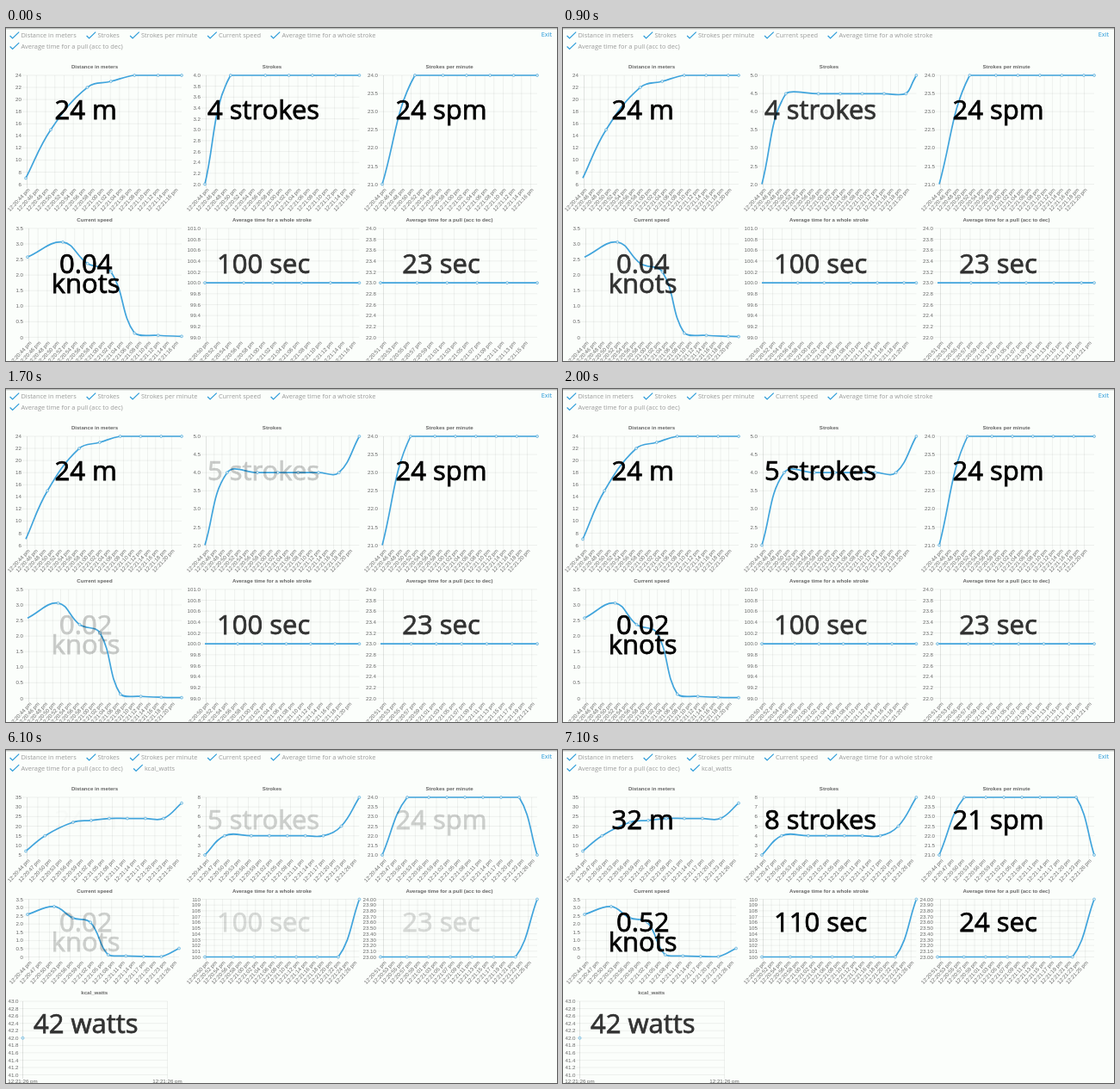
Recreate the animation shown at these times as an HTML page. Size 640 by 387 pixels, loop 8 s.

```html
<!DOCTYPE html>
<html lang="en">
<head>
<meta charset="utf-8">
<title>Rowing dashboard</title>
<style>
  html, body { margin: 0; width: 100%; height: 100%; overflow: hidden; background: #fbfefb; }
  svg { display: block; width: 640px; height: 387px; }
  .menu { font: 7.4px "Open Sans", "Noto Sans", sans-serif; fill: #999; }
  .exit { fill: #2196d8; }
  .check { fill: none; stroke: #2b9bd9; stroke-width: 1.15; }
  .title { font: bold 6.1px "Liberation Sans", Arial, sans-serif; fill: #666; text-anchor: middle; }
  .tick { font: 6.2px "Liberation Sans", Arial, sans-serif; fill: #666; text-anchor: end; }
  .mid { text-anchor: middle; }
  .grid { fill: none; stroke: #000; stroke-opacity: .1; stroke-width: .55; }
  .axis { fill: none; stroke: #000; stroke-opacity: .2; stroke-width: .55; }
  .line { fill: none; stroke: #40a4dc; stroke-width: 1.7; }
  .dot { fill: #dcebf1; stroke: #40a4dc; stroke-width: .6; }
  .value { font: 31px "Open Sans", "Noto Sans", sans-serif; text-anchor: middle; stroke: #000; stroke-width: .75; }
</style>
</head>
<body>
<svg id="stage" viewBox="0 0 640 387"></svg>
<script>
const LOOP = 8000, STEP = 100;
const FIRST_UPDATE = 700, SECOND_UPDATE = 5800, RESIZE = 5900;
const TALL = 126.5, SHORT = 67;
const stage = document.getElementById('stage');

// Sample times: a start, an irregular second sample, then regular ones.
const times = (second, third, gap, count) =>
  [0, second, ...Array.from({ length: count - 2 }, (_, i) => third + i * gap)];
const steady = (value, count, last) => [...Array(count - 1).fill(value), last];

// Scales are [min, max, step, decimals] for each of the three data phases.
const charts = [
  { title: 'Distance in meters', col: 0, row: 0, x0: 23, x1: 204, start: 44,
    times: times(5.4, 13.3, 5.1, 9), data: [7, 15, 22, 23, 24, 24, 24, 24, 32],
    scales: [[6, 24, 2, 0], [6, 24, 2, 0], [5, 35, 5, 0]],
    words: ['24 m', '24 m', '32 m'], begin: 5715, fade: 5725 },
  { title: 'Strokes', col: 1, row: 0, x0: 231, x1: 410.4, start: 44,
    times: times(5.6, 13.2, 5.12, 9), data: [2, 4, 4, 4, 4, 4, 4, 5, 8],
    scales: [[2, 4, .2, 1], [2, 5, .5, 1], [2, 8, 1, 0]],
    words: ['4 strokes', '5 strokes', '8 strokes'] },
  { title: 'Strokes per minute', col: 2, row: 0, x0: 437, x1: 617, start: 44,
    times: times(7.1, 13.2, 5.12, 9), data: [21, ...steady(24, 8, 21)],
    scales: Array(3).fill([21, 24, .5, 1]),
    words: ['24 spm', '24 spm', '21 spm'] },
  { title: 'Current speed', col: 0, row: 1, x0: 25, x1: 204, resizedX1: 201, start: 44,
    times: times(7.7, 13.1, 5.13, 9), data: [2.58, 3.06, 2.37, 2.1, .13, .06, .03, .02, .52],
    scales: Array(3).fill([0, 3.5, .5, 1]),
    words: ['0.04 knots', '0.02 knots', '0.52 knots'] },
  { title: 'Average time for a whole stroke', col: 1, row: 1, x0: 231, x1: 410.4, start: 50,
    times: times(6.9, 12, 5.12, 8), data: steady(100, 8, 110),
    scales: [[99, 101, .2, 1], [99, 101, .2, 1], [100, 110, 1, 0]],
    words: ['100 sec', '100 sec', '110 sec'], shade: .8 },
  { title: 'Average time for a pull (acc to dec)', col: 2, row: 1, x0: 435, x1: 617, start: 51,
    times: times(6.2, 11.3, 5.1, 8), data: steady(23, 8, 24), inset: 3.5, lastTicks: [75, 81, 85],
    scales: [[22, 24, .2, 1], [22, 24, .2, 1], [23, 24, .1, 2]],
    words: ['23 sec', '23 sec', '24 sec'], shade: .8 }
];

const clamp = (v, lo, hi) => Math.min(hi, Math.max(lo, v));
const mix = (a, b, p) => a + (b - a) * p;
const easeOut = p => 1 - (1 - clamp(p, 0, 1)) ** 4;
const swing = p => .5 - Math.cos(Math.PI * clamp(p, 0, 1)) / 2;
const r = v => +v.toFixed(2);
const text = (cls, x, y, str, extra = '') =>
  `<text class="${cls}" x="${r(x)}" y="${r(y)}" ${extra}>${str}</text>`;
const path = (cls, d) => `<path class="${cls}" d="${d}"/>`;
const dot = (x, y) => `<circle class="dot" cx="${r(x)}" cy="${r(y)}" r="1.5"/>`;
const clock = s => `12:${20 + Math.floor(s / 60)}:${String(s % 60).padStart(2, '0')} pm`;

function menu(t) {
  const items = [[4.6, 0, 'Distance in meters'], [93.6, 0, 'Strokes'], [144.1, 0, 'Strokes per minute'],
    [234.1, 0, 'Current speed'], [307.6, 0, 'Average time for a whole stroke'],
    [4.6, 1, 'Average time for a pull (acc to dec)']];
  if (t >= SECOND_UPDATE) items.push([148.1, 1, 'kcal_watts']);
  return '<rect width="640" height="1.4" fill="#bcbebc"/>' +
    items.map(([x, row, str]) => path('check', `M${x} ${9 + row * 12.5}l3 3l7.6-7.4`) +
      text('menu', x + 12.8, 11.2 + row * 12.3, str)).join('') +
    text('menu exit', 621.7, 10.3, 'Exit');
}

function yAxis(x0, x1, top, height, [min, max, step, decimals]) {
  const count = Math.round((max - min) / step);
  let d = '', out = '';
  for (let i = 0; i <= count; i++) {
    const y = top + height * (1 - i / count), v = min + i * step;
    d += `M${x0 - 4} ${r(y)}H${x1}`;
    out += text('tick', x0 - 5, y + 2.1, v ? v.toFixed(decimals) : '0');
  }
  return path('grid', d) + out;
}

function xAxis(chart, phase, x1, top, height) {
  const { x0, start, inset = 1.5, lastTicks = [76, 80, 86] } = chart;
  const step = phase === 2 && start === 44 ? 3 : 2;
  const range = chart.times[sampleCount(chart, phase) - 1];
  const bottom = top + height;
  let d = '', out = '';
  for (let s = start; s <= lastTicks[phase]; s += step) {
    const x = x0 + inset + (s - start) / range * (x1 - x0);
    if (s > start) d += `M${r(x)} ${top}V${bottom + 4.5}`;
    out += `<g transform="translate(${r(x + 2)} ${bottom + 5.5}) rotate(-47)">${text('tick', 0, 2.1, clock(s))}</g>`;
  }
  return path('grid', d) + path('axis', `M${x0 + inset} ${top}V${bottom + 4.5}`) + out;
}

const sampleCount = (chart, phase) => chart.data.length - 2 + phase;

// Returns [x, y, handle in x, y, handle out x, y] for every sample.
function nodes(chart, phase, x1, top, height) {
  const count = sampleCount(chart, phase), [min, max] = chart.scales[phase];
  const range = chart.times[count - 1];
  const pts = chart.data.slice(0, count).map((v, i) => [
    chart.x0 + chart.times[i] / range * (x1 - chart.x0),
    top + height * (1 - (v - min) / (max - min))]);
  return pts.map((p, i) => {
    const a = pts[i - 1] || p, b = pts[i + 1] || p;
    const before = Math.hypot(p[0] - a[0], p[1] - a[1]);
    const after = Math.hypot(b[0] - p[0], b[1] - p[1]);
    const handle = k => [
      clamp(p[0] + k * (b[0] - a[0]), chart.x0, x1),
      clamp(p[1] + k * (b[1] - a[1]), top, top + height)];
    const tension = .4 / (before + after);
    return [...p, ...handle(-tension * before), ...handle(tension * after)];
  });
}

function curve(list, hideFirst) {
  const d = list.map((n, i) => i
    ? `C${[...list[i - 1].slice(4), n[2], n[3], n[0], n[1]].map(r)}`
    : `M${r(n[0])} ${r(n[1])}`).join('');
  return path('line', d) + list.slice(hideFirst ? 1 : 0).map(n => dot(n[0], n[1])).join('');
}

function plot(chart, t) {
  const phase = t < FIRST_UPDATE ? 0 : t < SECOND_UPDATE ? 1 : 2;
  const resized = t >= RESIZE;
  const height = resized ? SHORT : TALL;
  const top = chart.row ? (phase === 2 ? 173.5 : 232.9) : 55;
  const x1 = phase === 2 && chart.resizedX1 || chart.x1;
  const begin = phase === 1 ? 738 : chart.begin || 5747;
  const progress = phase === 0 || resized ? 1 : easeOut((t - begin) / 1000);
  let list = nodes(chart, phase, x1, top, height);
  if (progress < 1) {
    const old = nodes(chart, phase - 1, chart.x1, top, height);
    list = list.map((n, i) => old[i] ? n.map((v, k) => mix(old[i][k], v, progress)) : n);
  }
  return text('title', 103 + chart.col * 206, top - 7.6, chart.title) +
    yAxis(chart.x0, x1, top, height, chart.scales[phase]) +
    xAxis(chart, phase, x1, top, height) + curve(list, progress < 1);
}

const dip = (t, start) => 1 - swing((t - start) / 400) + swing((t - start - 800) / 400);

function value(chart, t) {
  const { words, col, row, shade = 1, fade = 5810 } = chart;
  const index = t >= fade + 600 ? 2 : t >= 1385 ? 1 : 0;
  let opacity = (index === 2 ? 1 : shade) * dip(t, fade);
  if (words[0] !== words[1]) opacity *= dip(t, 783);
  const moved = t >= SECOND_UPDATE;
  const y = row ? (moved ? 210.5 : 284.5) : (moved ? 92 : 106);
  const lines = row === 1 && col === 0 ? words[index].split(' ') : [words[index]];
  return lines.map((str, i) =>
    text('value', 92.7 + col * 206.4, y + i * 23.7, str, `opacity="${r(opacity)}"`)).join('');
}

function watts(t) {
  const settled = t >= RESIZE;
  const x0 = 19.5, x1 = settled ? 187.5 : 219.5, top = 292, height = 85.5, bottom = top + height;
  const y = settled ? top + height / 2 : 370;
  return text('title', settled ? 102.7 : 118.5, top - 7.6, 'kcal_watts') +
    yAxis(x0, x1, top, height, [41, 43, .2, 1]) +
    path('grid', `M${x1} ${top}V${bottom + 4.5}`) +
    path('axis', `M${x0} ${top}V${bottom + 4.5}`) +
    [x0, x1].map(x => text('tick mid', x, 386.8, clock(86))).join('') +
    dot(x0, y) + text('value', 92.7, 329, '42 watts', 'opacity=".8"');
}

function render(t) {
  stage.innerHTML = menu(t) + charts.map(c => plot(c, t)).join('') +
    (t >= SECOND_UPDATE ? watts(t) : '') + charts.map(c => value(c, t)).join('');
}

let shown = -1;
function tick() {
  const t = Math.floor(performance.now() % LOOP / STEP) * STEP;
  if (t !== shown) render(shown = t);
  requestAnimationFrame(tick);
}
tick();
</script>
</body>
</html>
```
